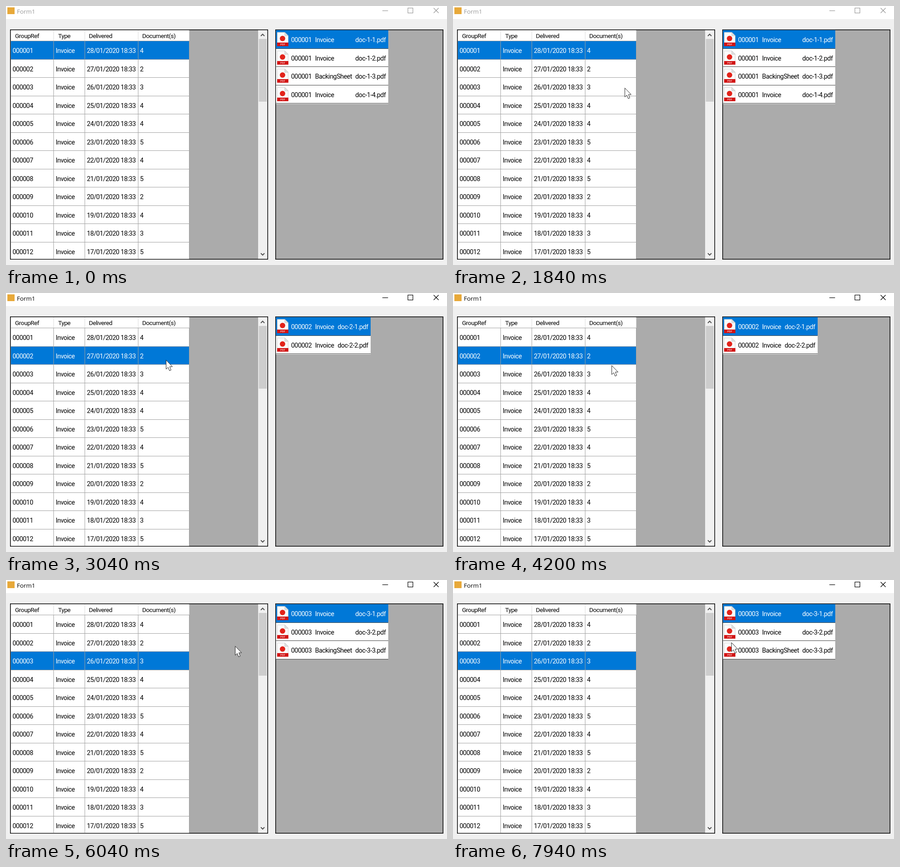
An HTML page with a canvas that plays this animation: 976 by 574 pixels, repeating every 7990 ms.

```html
<!DOCTYPE html>
<html lang="en">
<head>
<meta charset="utf-8">
<title>Form1</title>
<style>
html, body { margin: 0; width: 100%; height: 100%; overflow: hidden; background: #f0f0f0; }
canvas { display: block; }
</style>
</head>
<body>
<canvas id="stage" width="976" height="574"></canvas>
<script>
const ctx = document.getElementById('stage').getContext('2d');
const LOOP = 7990, ROW = 40.5, BLUE = '#0078d7', GREY = '#ababab', RULE = '#a0a0a0';
const SANS = 'Roboto, sans-serif';
const COUNTS = [4, 2, 3, 4, 4, 5, 4, 5, 2, 4, 3, 5];
const COLS = [105.5, 174.5, 292.5, 405.5];

// Pointer moves: start, end, steps, ease-out power, target, optional bend point
const START = [843, 615];
const MOVES = [
  { t0: 560, t1: 690, n: 4, pow: 1, to: [694, 396] },
  { t0: 920, t1: 1050, n: 4, pow: 1, to: [520, 281] },
  { t0: 1280, t1: 1480, n: 5, pow: 1.2, to: [417, 218] },
  { t0: 1710, t1: 2470, n: 17, pow: 3, to: [354, 148], bend: [381, 187] },
  { t0: 3930, t1: 4530, n: 14, pow: 0.74, to: [347, 177] },
  { t0: 5600, t1: 6240, n: 14, pow: 1.84, to: [525, 148.5], bend: [436, 133] },
  { t0: 6530, t1: 6980, n: 10, pow: 2, to: [616, 139], bend: [570, 121] },
  { t0: 7890, t1: 7940, n: 2, pow: 1, to: [616, 138] }
];
const CLICKS = [
  { t0: 2800, t1: 3040, x: 354, y: 148 },
  { t0: 4670, t1: 4910, x: 347, y: 177 }
];

function rect(x, y, w, h, color) {
  ctx.fillStyle = color;
  ctx.fillRect(x, y, w, h);
}

function text(str, x, y, color, { size = 14.3, align = 'left', family = SANS, spacing = -0.45 } = {}) {
  ctx.font = `${size}px ${family}`;
  ctx.letterSpacing = `${spacing}px`;
  ctx.textAlign = align;
  ctx.fillStyle = color;
  ctx.fillText(str, x, y);
}

function line(points, color, width = 1) {
  ctx.beginPath();
  points.forEach(([x, y]) => ctx.lineTo(x, y));
  ctx.strokeStyle = color;
  ctx.lineWidth = width;
  ctx.stroke();
}

function shape(points, fill, stroke) {
  ctx.beginPath();
  points.forEach(([x, y]) => ctx.lineTo(x, y));
  ctx.closePath();
  ctx.fillStyle = fill;
  ctx.fill();
  ctx.strokeStyle = stroke;
  ctx.lineWidth = 1;
  ctx.stroke();
}

function disc(x, y, r, color) {
  ctx.beginPath();
  ctx.arc(x, y, r, 0, 7);
  ctx.fillStyle = color;
  ctx.fill();
}

function panel(x, w) {
  rect(x, 52, w, 510, '#000');
  rect(x + 1.5, 53.5, w - 3, 507, GREY);
}

function titleBar(active) {
  const ink = active ? '#000' : '#999';
  rect(0, 0, 976, 29, '#fff');
  rect(3, 3, 16, 15, '#e8a93a');
  text('Form1', 24, 17, ink, { size: 13.4, family: '"Open Sans", sans-serif', spacing: 0 });
  line([[833, 10.5], [845.5, 10.5]], ink, 1.2);
  ctx.strokeRect(889.5, 4.5, 11, 11);
  line([[946.5, 4.5], [957.5, 15.5]], ink, 1.2);
  line([[957.5, 4.5], [946.5, 15.5]], ink, 1.2);
}

function scrollBar() {
  rect(558, 53.5, 20.5, 507, '#f0f0f0');
  rect(559.5, 73, 17.5, 139, '#cdcdcd');
  line([[564, 66.5], [568, 62.5], [572, 66.5]], '#505050', 2);
  line([[564, 548], [568, 552], [572, 548]], '#505050', 2);
}

function grid(selected, partial) {
  const head = { size: 13.6 };
  panel(9, 571);
  ctx.save();
  ctx.beginPath();
  ctx.rect(10.5, 53.5, 568, 507);
  ctx.clip();
  rect(10.5, 53.5, 394.5, 508, '#fff');
  text('GroupRef', 20, 71, '#000', head);
  text('Type', 115.5, 71, '#000', head);
  text('Delivered', 183.5, 71, '#000', head);
  text('Document(s)', 301.5, 71, '#000', head);
  COUNTS.forEach((count, i) => {
    const top = Math.floor(77.5 + i * ROW), y = top + 27, on = i + 1 === selected;
    if (on) rect(10.5, top, partial ? 282 : 394.5, 41, BLUE);
    const ink = on ? '#fff' : '#000';
    text(String(i + 1).padStart(6, '0'), 14.5, y, ink);
    text('Invoice', 110, y, ink);
    text(`${28 - i}/01/2020 18:33`, 179, y, ink);
    text(count, 296.5, y, on && partial ? '#000' : ink);
    line([[10.5, top + .5], [405, top + .5]], RULE);
  });
  COLS.forEach(x => {
    line([[x, 54], [x, 77]], '#dcdcdc');
    line([[x, 77], [x, 561]], RULE);
  });
  scrollBar();
  ctx.restore();
}

function fileIcon(x, y) {
  shape([[x + .5, y + .5], [x + 17, y + .5], [x + 24.5, y + 8], [x + 24.5, y + 30.5], [x + .5, y + 30.5]], '#fafafa', '#d4d4d4');
  shape([[x + 17, y + .5], [x + 17, y + 8], [x + 24.5, y + 8]], '#e2e2e2', '#c8c8c8');
  disc(x + 12, y + 14, 6, '#e2231a');
  rect(x, y + 23, 25, 8, '#d21414');
  text('PDF', x + 12.5, y + 29.3, '#fff', { size: 6, align: 'center', spacing: 0 });
}

function fileList(group) {
  panel(596, 372);
  const right = group === 2 ? 807 : 846;
  for (let i = 0; i < COUNTS[group - 1]; i++) {
    const top = Math.floor(53.5 + i * ROW), y = top + 27, ink = i ? '#000' : '#fff';
    const edge = Math.floor(53.5 + (i + 1) * ROW);
    rect(597.5, i ? top + 1 : 53.5, right - 597.5, 41, i ? '#fff' : BLUE);
    line([[597.5, edge + .5], [right, edge + .5]], '#404040');
    fileIcon(600, top + 5);
    text(String(group).padStart(6, '0'), 631, y, ink);
    text(i === 2 ? 'BackingSheet' : 'Invoice', 684, y, ink);
    text(`doc-${group}-${i + 1}.pdf`, right - 5.5, y, ink, { align: 'right' });
  }
}

function pointerAt(t) {
  let pos = START;
  for (const { t0, t1, n, pow, to, bend } of MOVES) {
    if (t < t0) break;
    const step = Math.min(n, 1 + Math.floor((t - t0) / (t1 - t0) * (n - 1) + 0.3));
    const s = 1 - (1 - step / n) ** pow;
    const from = pos;
    pos = to.map((end, k) => {
      const mid = bend ? bend[k] : (from[k] + end) / 2;
      return (1 - s) ** 2 * from[k] + 2 * s * (1 - s) * mid + s * s * end;
    });
  }
  return pos.map(Math.round);
}

function pointer(x, y) {
  const outline = [[0, 0], [0, 20], [4.5, 16], [7.5, 23.5], [11, 22], [8, 14.5], [14, 14.5]];
  shape(outline.map(([dx, dy]) => [x + dx + .3, y + dy + .7]), '#fff', '#222');
}

function draw(t) {
  const group = t < 2840 ? 1 : t < 4720 ? 2 : 3;
  const partial = t >= 2840 && t < 2890 || t >= 4720 && t < 4760;
  rect(0, 0, 976, 574, '#f0f0f0');
  titleBar(t >= 2800);
  grid(group, partial);
  fileList(group);
  for (const c of CLICKS) {
    if (t >= c.t0 && t < c.t1) disc(c.x, c.y, 14.5, 'rgba(255, 255, 0, .6)');
  }
  if (t >= 560) pointer(...pointerAt(t));
}

const begin = performance.now();
function tick() {
  draw((performance.now() - begin) % LOOP);
  requestAnimationFrame(tick);
}
tick();
</script>
</body>
</html>
```
